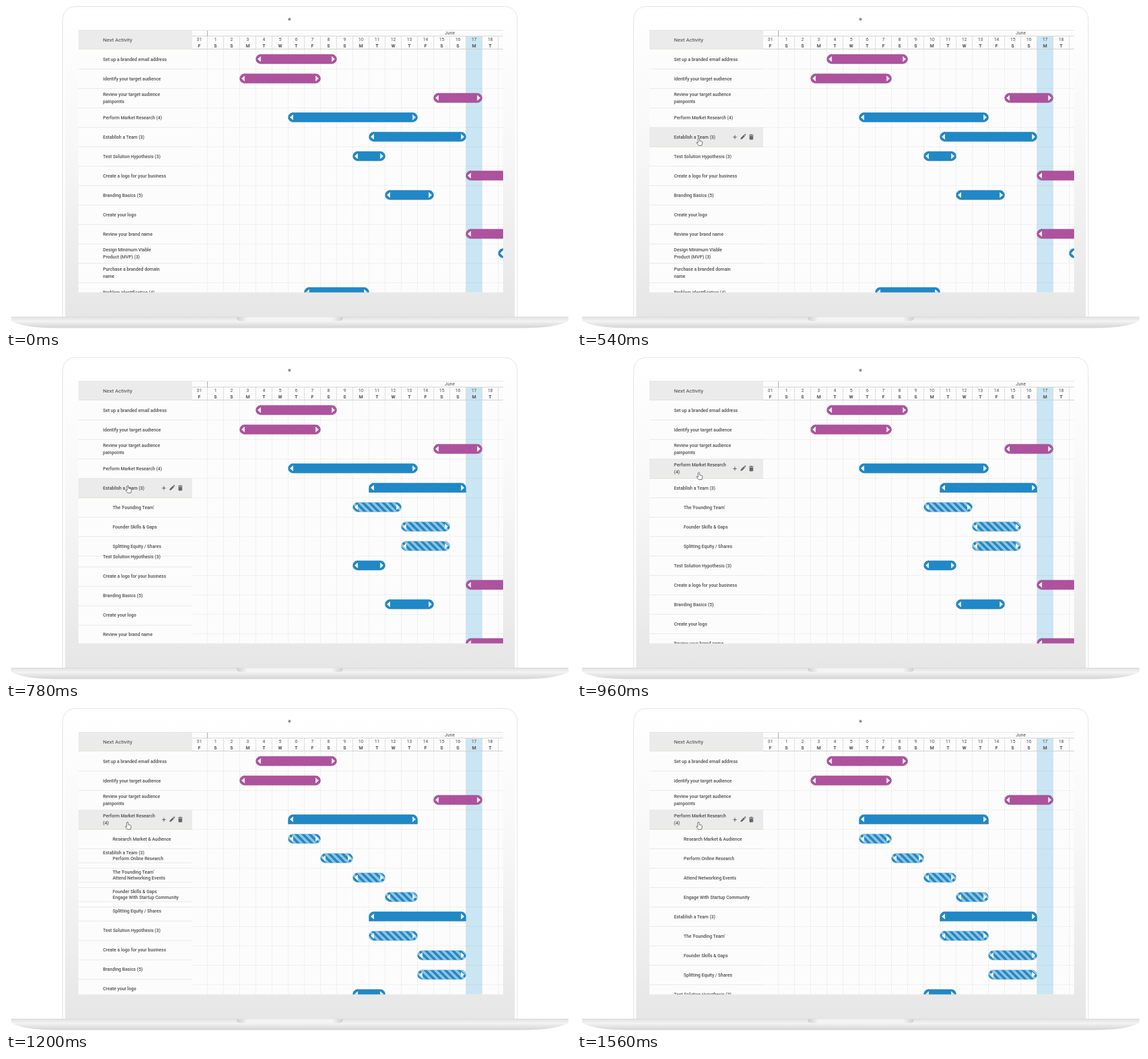
Animation of 874x499 px, one loop 3.56 s. Source, as an HTML page:

```html
<!DOCTYPE html>
<html lang="en">
<head>
<meta charset="utf-8">
<title>Gantt planner</title>
<style>
html, body { margin: 0; width: 100%; height: 100%; overflow: hidden; background: #fff; }
svg { display: block; width: 874px; height: 499px; }
text { font: 500 7px Roboto, Arial, sans-serif; fill: #4b4b4b; }
.date { font-weight: 400; text-anchor: middle; }
.day { font-weight: 700; text-anchor: middle; }
.title { font-size: 8.1px; font-weight: 400; fill: #444; }
</style>
</head>
<body>
<svg viewBox="0 0 874 499" xmlns="http://www.w3.org/2000/svg">
  <defs>
    <linearGradient id="lid" x2="0" y2="1">
      <stop offset="0" stop-color="#fff"/><stop offset=".45" stop-color="#f7f7f7"/><stop offset="1" stop-color="#e6e6e6"/>
    </linearGradient>
    <linearGradient id="deck" x2="0" y2="1">
      <stop offset="0" stop-color="#d8d8d8"/><stop offset=".3" stop-color="#e7e7e7"/><stop offset="1" stop-color="#efefef"/>
    </linearGradient>
    <linearGradient id="foot" x2="0" y2="1">
      <stop offset="0" stop-color="#f4f4f4"/><stop offset="1" stop-color="#d4d4d4"/>
    </linearGradient>
    <linearGradient id="notch">
      <stop offset="0" stop-color="#cfcfcf"/><stop offset=".1" stop-color="#f4f4f4"/>
      <stop offset=".9" stop-color="#f4f4f4"/><stop offset="1" stop-color="#cfcfcf"/>
    </linearGradient>
    <pattern id="stripes" width="7.4" height="7.4" patternUnits="userSpaceOnUse" patternTransform="rotate(-45)">
      <rect width="7.4" height="7.4" fill="#8fc3e2"/><rect width="3.7" height="7.4" fill="#2088c6"/>
    </pattern>
    <clipPath id="screen"><rect x="112" y="37" width="657" height="405.5"/></clipPath>
  </defs>

  <path d="M87.5 481V23Q87.5 .5 110 .5H768Q791 .5 791 23V481Z" fill="#fdfdfd" stroke="#e4e4e4"/>
  <path d="M91.5 481V24Q91.5 4 111 4H767Q787 4 787 24V481Z" fill="url(#lid)"/>
  <circle cx="438.5" cy="20.5" r="2.4" fill="#b5b5b5"/>
  <circle cx="438.5" cy="20.5" r="1.2" fill="#777"/>
  <path d="M8 486.5H870Q850 497.500 800 497.500H78Q28 497.500 8 486.5Z" fill="url(#foot)"/>
  <rect x="8" y="480" width="862" height="6.5" fill="url(#deck)"/>
  <path d="M357 480.500H521V483Q520 486.500 515 486.500H363Q358 486.500 357 483Z" fill="url(#notch)"/>

  <g clip-path="url(#screen)">
    <rect x="112" y="37" width="657" height="406" fill="#fcfcfc"/>
    <g id="grid"></g>
    <g id="rows"></g>
    <g id="head"></g>
  </g>
  <path id="hand" d="M-1.200 .9Q0 -.7 1.100 .9V4.300L4.400 5Q5.700 5.400 5.500 7L4.700 11.400H-.3L-3.300 7.700Q-3.700 6.500 -2.500 6.500L-1.200 7.600Z" fill="#fff" stroke="#555" stroke-width=".85" stroke-linejoin="round"/>
</svg>
<script>
const STEP = 60, END = 1560, LOOP = 3560, ROW = 30, TOP = 67;
const OPEN_TEAM = 600, OPEN_MARKET = 1133, SLIDE = 240;
const $ = id => document.getElementById(id);
const colX = day => 311.5 + 25 * (day - 1);
const line = (x1, y1, x2, y2, color) =>
  `<path d="M${x1} ${y1}L${x2} ${y2}" stroke="${color}" fill="none"/>`;
const rect = (x, y, w, h, fill) =>
  `<rect x="${x}" y="${y}" width="${w}" height="${h}" fill="${fill}"/>`;
const text = (x, y, s, cls = "") =>
  `<text x="${x}" y="${y}" class="${cls}">${s.replace(/&/g, "&amp;")}</text>`;

// Each task: label, first day, last day, kind; "|" breaks a line.
const before = [
  ["Set up a branded email address", 4, 8, "own"],
  ["Identify your target audience", 3, 7, "own"],
  ["Review your target audience|painpoints", 15, 17, "own"]
];
const market = ["Perform Market Research (4)", 6, 13, "group"];
const marketKids = [
  ["Research Market & Audience", 6, 7, "kid"],
  ["Perform Online Research", 8, 9, "kid"],
  ["Attend Networking Events", 10, 11, "kid"],
  ["Engage With Startup Community", 12, 13, "kid"]
];
const team = ["Establish a Team (3)", 11, 16, "group"];
const teamKids = shift => [
  ["The 'Founding Team'", 10 + shift, 12 + shift, "kid"],
  ["Founder Skills & Gaps", 13 + shift, 15 + shift, "kid"],
  ["Splitting Equity / Shares", 13 + shift, 15 + shift, "kid"]
];
const after = [
  ["Test Solution Hypothesis (3)", 10, 11, "group"],
  ["Create a logo for your business", 17, 21, "own"],
  ["Branding Basics (5)", 12, 14, "group"],
  ["Create your logo"],
  ["Review your brand name", 17, 21, "own"],
  ["Design Minimum Viable|Product (MVP) (3)", 19, 22, "group"],
  ["Purchase a branded domain|name"],
  ["Problem Identification (4)", 7, 10, "group"]
];

// Cursor tip: time, x, y
const path = [[60, 300, 215], [240, 190, 199], [300, 187.7, 198.5], [540, 188.5, 204],
  [780, 188.5, 198.5], [960, 188.5, 178], [1200, 188, 176], [END, 188, 176]];

const swing = p => .5 - .5 * Math.cos(Math.PI * Math.min(1, Math.max(0, p)));

function cursorAt(t) {
  const i = Math.max(1, path.findIndex(k => k[0] >= t));
  const [a, b] = [path[i - 1], path[i]];
  const p = swing((t - a[0]) / (b[0] - a[0]));
  return [1, 2].map(n => a[n] + (b[n] - a[n]) * p);
}

function drawFrame() {
  let grid = "", head = rect(112, 37, 176, 29, "#ebebeb") + rect(288, 37, 481, 29, "#fcfcfc");
  grid += rect(711.5, 66, 25, 377, "#c9e6f2");
  head += rect(711.5, 47, 25, 20, "#c9e6f2");
  for (let d = 1; d <= 19; d++) {
    const x = colX(d);
    grid += `<path d="M${x} 67V443" stroke="#777" stroke-opacity=".13" stroke-dasharray="2 1"/>`;
    head += line(x, 47, x, 66, "#ddd");
  }
  for (let y = 97.5; y < 443; y += ROW)
    grid += `<path d="M288 ${y}H769" stroke="#777" stroke-opacity=".13" stroke-dasharray="2 1"/>`;
  for (let d = 0; d <= 18; d++) {
    head += text(colX(d) + 12.5, 54, String(d || 31), "date");
    head += text(colX(d) + 12.5, 64, "SMTWTFS"[(d + 5) % 7], "day");
  }
  head += line(288, 46.5, 769, 46.5, "#d5d5d5") + line(288, 66.5, 769, 66.5, "#d0d0d0");
  head += line(112, 66.5, 288, 66.5, "#e7e3d6") + line(311.5, 38, 311.5, 47, "#aaa");
  head += line(112, 37.5, 769, 37.5, "#e6e6e6");
  head += text(150, 54.7, "Next Activity", "title") + text(686.5, 44, "June", "date");
  $("grid").innerHTML = grid;
  $("head").innerHTML = head;
}

function bar([, from, to, kind], y, open) {
  if (!from) return "";
  const x = colX(from), end = colX(to + 1), r = 7.2;
  const low = open ? 0 : r;
  const [fill, edge] = { own: ["#ae529e", "#873b7a"], group: ["#2088c6", "#176b9d"],
    kid: ["url(#stripes)", "#4f9dce"] }[kind];
  const shape = `M${x + r} ${y - r}H${end - r}a${r} ${r} 0 0 1 ${r} ${r}v${r - low}` +
    (low ? `a${r} ${r} 0 0 1 ${-r} ${r}H${x + r}a${r} ${r} 0 0 1 ${-r} ${-r}`
         : `H${x}v${-r}`) + `a${r} ${r} 0 0 1 ${r} ${-r}Z`;
  const arrow = (tip, s) => `<path d="M${tip} ${y}l${5 * s} -4.600v9.200Z" fill="#fff"/>`;
  return `<path d="${shape}" fill="${fill}" stroke="${edge}" stroke-width=".7" stroke-dasharray="1.300 1.200"/>` +
    arrow(x + 2.7, 1) + arrow(end - 2.7, -1);
}

const icons = y => `<g transform="translate(0 ${y})" fill="#666">
  <path d="M241.200 .5h6M244.200 -2.500v6" stroke="#666" stroke-width="1.200"/>
  <path d="M253 4l.5-2.400 4.600-4.600 1.900 1.900-4.600 4.600ZM258.700 -3.600l.8-.7q.5-.3 1 .1l.6.7q.4.5 0 .9l-.6.8Z"/>
  <path d="M266.200 -3.300h2l.6-.8h1.600l.6.8h2v1.100h-6.800ZM266.700 -1.600h5.800v5q0 1-1 1h-3.800q-1 0-1-1Z"/></g>`;

function label(task, y, hover) {
  let words = task[0];
  if (hover && task === market) words = words.replace(" (", "|(");
  const lines = words.split("|"), x = task[3] === "kid" ? 165 : 150;
  const first = y + 2.5 - 5.2 * (lines.length - 1);
  return lines.map((s, i) => text(x, first + 10.4 * i, s)).join("");
}

function draw(t) {
  const teamOpen = t >= OPEN_TEAM, marketOpen = t >= OPEN_MARKET;
  const [cx, cy] = cursorAt(t);
  const tasks = [...before, market, ...(marketOpen ? marketKids : []), team,
    ...(teamOpen ? teamKids(marketOpen ? 1 : 0) : []), ...after];
  const teamGap = teamOpen ? 3 * ROW * (1 - swing((t - OPEN_TEAM) / SLIDE)) : 0;
  const marketGap = marketOpen ? 4 * ROW * (1 - swing((t - OPEN_MARKET) / SLIDE)) : 0;
  let back = "", list = "", bars = "", lag = 0;

  tasks.forEach((task, i) => {
    if (task === team) lag += marketGap;
    if (task === after[0]) lag += teamGap;
    const slot = TOP + i * ROW, y = slot - lag;
    const hover = t >= path[0][0] && cx < 288 && cy >= y && cy < y + ROW;
    if (hover) back += rect(112, y, 176, ROW, "#ebebeb") + icons(y + 15);
    list += line(112, y + ROW + .5, 288, y + ROW + .5, hover ? "#e2ddcb" : "#e9e9e7");
    list += label(task, y + 15, hover);
    const open = task === team && teamOpen || task === market && marketOpen;
    bars += bar(task, slot + 15, open);
  });
  $("rows").innerHTML = back + list + bars;
  $("hand").setAttribute("transform", `translate(${cx} ${cy})`);
  $("hand").style.display = t < path[0][0] ? "none" : "";
}

let shown = -1;
function tick(now) {
  const t = Math.min(END, Math.floor(now % LOOP / STEP) * STEP);
  if (t !== shown) draw(shown = t);
  requestAnimationFrame(tick);
}
drawFrame();
draw(0);
requestAnimationFrame(tick);
</script>
</body>
</html>
```
